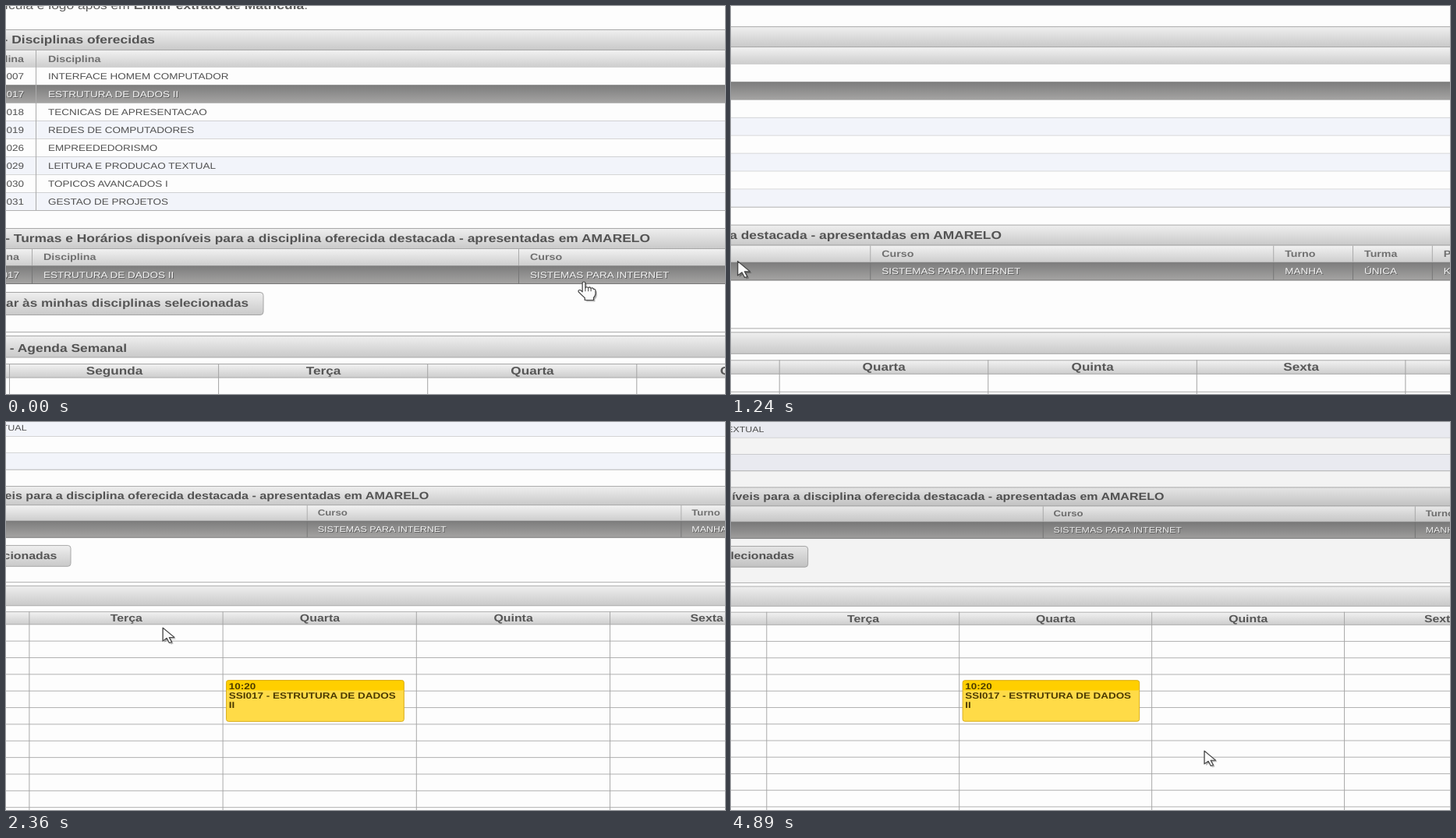
These frames come from a looping animation (922x498 px, 4.95 s). An HTML page:

```html
<!DOCTYPE html>
<html lang="pt-BR">
<head>
<meta charset="utf-8">
<title>Agenda Semanal</title>
<style>
  html, body { margin: 0; width: 100%; height: 100%; overflow: hidden; background: #fdfdfd; }
  svg { display: block; width: 922px; height: 498px; }
  text { font-family: "Liberation Sans", Arial, sans-serif; text-rendering: geometricPrecision; white-space: pre; }
  .title, .day, .button, .label, .event { font-weight: bold; }
  .title { font-size: 14.5px; fill: #535353; }
  .intro { font-size: 14.5px; fill: #5c5c5c; }
  .intro tspan { font-weight: bold; }
  .button, .day { font-size: 14.3px; fill: #565656; }
  .label { font-size: 11.9px; fill: #707070; }
  .cell { font-size: 11.25px; fill: #505050; }
  .picked { font-size: 11.25px; fill: #f4f4f4; }
  .shade { font-size: 11.25px; fill: #5c5c5c; }
  .event { font-size: 12.15px; fill: #4c3b00; }
  .shadow { opacity: .28; }
</style>
</head>
<body>
<svg viewBox="0 0 922 498">
  <defs>
    <linearGradient id="bar" x2="0" y2="1"><stop stop-color="#efefef"/><stop offset="1" stop-color="#c9c9c9"/></linearGradient>
    <linearGradient id="head" x2="0" y2="1"><stop stop-color="#f2f2f2"/><stop offset="1" stop-color="#cdcdcd"/></linearGradient>
    <linearGradient id="dark" x2="0" y2="1"><stop stop-color="#7c7c7c"/><stop offset="1" stop-color="#a5a4a3"/></linearGradient>
    <path id="arrowShape" d="M0 0V16L3.7 12.5 6.2 18.3 8.6 17.3 6.1 11.6H11Z"/>
    <path id="handShape" d="M-1.5 1Q0-1 1.5 1V7Q3 5 4.5 7Q6 5 7.3 7.6Q9 6 10 8.5Q12 8 12 10.5V14Q11.5 17 10 18V21H1V18.5Q-2 15.5-5.5 11.5Q-6 9-3.5 9.5L-1.5 11.5Z"/>
  </defs>
  <g id="camera">
    <g id="page"></g>
    <g id="mouse" stroke-linejoin="round">
      <g id="arrow" transform="scale(1.45 1.15)">
        <use href="#arrowShape" class="shadow" x="1.5" y="1.8"/>
        <use href="#arrowShape" fill="#fbfbfb" stroke="#484848"/>
      </g>
      <g id="hand" transform="scale(1.25 1.12)">
        <use href="#handShape" class="shadow" x="1.5" y="1.8"/>
        <use href="#handShape" fill="#fbfbfb" stroke="#444"/>
        <path d="M1.5 7V11M4.5 7V11M7.3 7.6V11" stroke="#666" fill="none"/>
      </g>
    </g>
  </g>
</svg>
<script>
const $ = id => document.getElementById(id);
const page = $('page'), RIGHT = 1600, LEFT = -60;

function add(name, attrs, parent = page) {
  const el = document.createElementNS('http://www.w3.org/2000/svg', name);
  for (const k in attrs) el.setAttribute(k, attrs[k]);
  return parent.appendChild(el);
}
const box = (x, y, width, height, fill, more) => add('rect', { x, y, width, height, fill, ...more });
const row = (y, h, fill) => box(LEFT, y, RIGHT - LEFT, h, fill);
const line = (x1, y1, x2, y2, stroke = '#ababab') => add('line', { x1, y1, x2, y2, stroke });
const across = (y, stroke) => line(LEFT, y, RIGHT, y, stroke);

function label(cls, x, y, str, anchor = 'start') {
  const el = add('text', { class: cls, 'text-anchor': anchor, transform: `translate(${x} ${y}) scale(1.2 1)` });
  el.textContent = str;
  return el;
}
function picked(x, y, str, anchor) {
  label('shade', x + 1, y + 1, str, anchor);
  label('picked', x, y, str, anchor);
}
function bar(y, h, fill = 'url(#bar)') {
  row(y, h, fill);
  across(y, '#a8a8a8');
  across(y + h, '#a8a8a8');
}

function drawSubjects() {
  const intro = label('intro', 387, 4, 'Para finalizar clique em Matrícula e logo após em ', 'end');
  add('tspan', {}, intro).textContent = 'Emitir extrato de Matrícula';
  intro.append('.');
  bar(30.5, 26);
  label('title', 191, 48, '1 - Disciplinas oferecidas', 'end');
  bar(56.5, 22, 'url(#head)');
  label('label', 23, 71.5, 'Disciplina', 'end');
  label('label', 54, 71.5, 'Disciplina');
  const subjects = ['007 INTERFACE HOMEM COMPUTADOR', '017 ESTRUTURA DE DADOS II', '018 TECNICAS DE APRESENTACAO',
    '019 REDES DE COMPUTADORES', '026 EMPREEDEDORISMO', '029 LEITURA E PRODUCAO TEXTUAL',
    '030 TOPICOS AVANCADOS I', '031 GESTAO DE PROJETOS'];
  subjects.forEach((s, i) => {
    const y = 78.5 + 23 * i, on = i === 1;
    row(y, 23, on ? 'url(#dark)' : i % 2 ? '#f2f4fa' : '#fdfdfd');
    const write = on ? picked : (...a) => label('cell', ...a);
    write(23, y + 15, 'SSI' + s.slice(0, 3), 'end');
    write(54, y + 15, s.slice(4));
    across(y + 23, on ? '#777' : '#b0b0b0');
  });
  line(38.5, 56, 38.5, 262);
}

function drawClasses() {
  bar(285.5, 26);
  label('title', 826, 303, '2 - Turmas e Horários disponíveis para a disciplina oferecida destacada - apresentadas em AMARELO', 'end');
  bar(311.5, 22, 'url(#head)');
  row(333.5, 23, 'url(#dark)');
  across(356.5, '#777');
  label('label', 17, 326, 'Disciplina', 'end');
  picked(17, 348.5, 'SSI017', 'end');
  const cols = [[33, 'Disciplina', 'ESTRUTURA DE DADOS II'], [657, 'Curso', 'SISTEMAS PARA INTERNET'],
    [1175, 'Turno', 'MANHA'], [1277, 'Turma', 'ÚNICA'], [1379, 'P', 'K']];
  for (const [x, head, cell] of cols) {
    line(x + .5, 312, x + .5, 333);
    line(x + .5, 334, x + .5, 356, '#777');
    label('label', x + 15, 326, head);
    picked(x + 15, 348.5, cell);
  }
  box(LEFT - 60, 367.5, 450, 29, 'url(#bar)', { rx: 4, stroke: '#a4a4a4' });
  label('button', 311, 386, 'Adicionar às minhas disciplinas selecionadas', 'end');
}

function drawWeek() {
  across(418.5, '#aaa');
  bar(423.5, 27.5);
  label('title', 155, 443.5, '3 - Agenda Semanal', 'end');
  bar(459.5, 17.5, 'url(#head)');
  for (let k = 1; k < 18; k++) across(477 + 23.06 * k);
  ['Segunda', 'Terça', 'Quarta', 'Quinta', 'Sexta', 'Sábado'].forEach((day, i) => {
    const x = 4.5 + 268.1 * i;
    line(x, 459, x, 900, '#a4a4a4');
    label('day', 139 + 268 * i, 473, day, 'middle');
  });
}

function drawEvent() {
  const x = 545.5, y = 554.5, w = 246, h = 57;
  box(x, y, w, h, '#ffdb47', { rx: 3 });
  box(x, y, w, 14, '#ffcf00', { rx: 3 });
  box(x, y, w, h, 'none', { rx: 3, stroke: '#d6a913' });
  label('event', 549, 566.5, '10:20');
  label('event', 549, 580, 'SSI017 - ESTRUTURA DE DADOS');
  label('event', 549, 592.5, 'II');
}

row(-300, 1300, '#fdfdfd');
drawSubjects();
drawClasses();
drawWeek();
drawEvent();
const dim = row(-300, 718, '#000');
dim.setAttribute('opacity', .04);

const LOOP = 4950, SCROLL_AT = 1500;
const ticks = [[0, 0, 1], [90, 450, 6], [600, 1060, 6], [1160, 1320, 3], [1500, 1500, 1], [1570, 1960, 5], [2040, 2520, 7],
  [2600, 2600, 1], [2750, 3230, 7], [3310, 3820, 8], [3880, 4030, 3], [4180, 4180, 1], [4350, 4810, 6], [4890, 4890, 1]]
  .flatMap(([a, b, n]) => Array.from({ length: n }, (_, i) => n > 1 ? a + (b - a) * i / (n - 1) : a));

const mix = (a, b, u) => a + (b - a) * u;
const left = (t, a, b, p) => Math.pow(1 - Math.min(1, Math.max(0, (t - a) / (b - a))), p);

// Camera poses: zoom and offset.
const START = { s: 1, x: 0, y: 0 }, PANNED = { s: .998, x: -478, y: -3.8 }, WIDE = { s: .921, x: -205.3, y: 23.6 };
const blend = (a, b, r) => ({ s: mix(a.s, b.s, r), x: mix(a.x, b.x, r), y: mix(a.y, b.y, r) });

function view(t) {
  if (t < SCROLL_AT) return blend(PANNED, START, left(t, 0, 1320, 2.4));
  return blend(WIDE, PANNED, t >= 2600 ? 0 : left(t, 1440, 2680, 2.04));
}

const stops = [[0, 741, 354], [450, 619, 341], [1160, 490, 333], [1240, 487, 332], [1570, 487, 332], [2040, 467.6, 269.2],
  [2600, 450, 256], [2750, 440, 252], [3070, 370.6, 245.8], [3230, 300, 262], [3560, 520, 420], [3820, 880, 488],
  [3880, 945, 450], [3955, 830, 385], [4030, 680, 350], [4180, 652, 304.5], [4350, 690, 330], [4720, 870, 440],
  [4810, 882, 432.6], [LOOP, 882, 432.6]];

function pointer(t) {
  const i = stops.findIndex(k => k[0] > t), [t0, x0, y0] = stops[i - 1], [t1, x1, y1] = stops[i];
  const u = (t - t0) / (t1 - t0);
  return [mix(x0, x1, u), mix(y0, y1, u)];
}

function draw(now) {
  const clock = now % LOOP;
  const t = ticks.filter(k => k <= clock + .5).pop();
  const { s, x, y } = view(t);
  $('camera').setAttribute('transform', `matrix(${s} 0 0 ${s} ${x} ${y})`);
  page.setAttribute('transform', `translate(0 ${t < SCROLL_AT ? 0 : -220})`);
  $('mouse').setAttribute('transform', `translate(${pointer(t)})`);
  const hand = t < 1160;
  $('hand').style.display = hand ? '' : 'none';
  $('arrow').style.display = hand ? 'none' : '';
  dim.style.display = t >= 4890 ? '' : 'none';
}
function frame() {
  draw(performance.now());
  requestAnimationFrame(frame);
}
frame();
</script>
</body>
</html>
```
